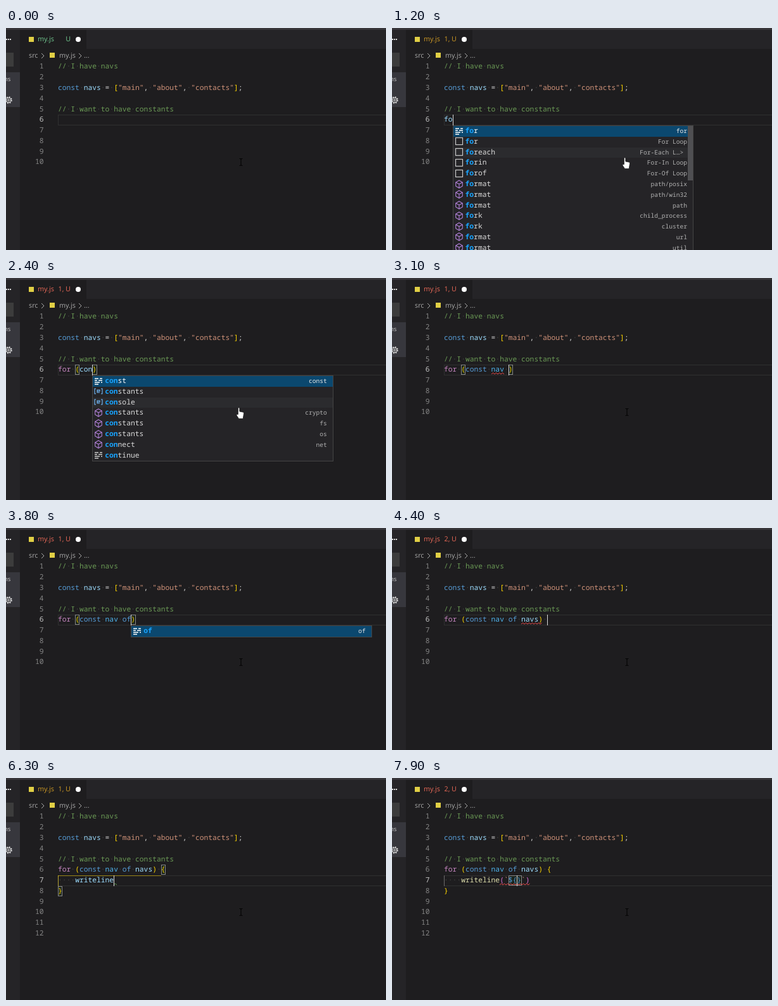
These frames come from a looping animation (600 px wide and 351 px high, 8000 ms). An HTML page:

```html
<!DOCTYPE html>
<html lang="en">
<head>
<meta charset="utf-8">
<title>Typing a loop in an editor</title>
<style>
html, body { margin: 0; width: 100%; height: 100%; overflow: hidden; background: #1e1d1f; }
#stage { position: relative; width: 600px; height: 351px; overflow: hidden; background: #1e1d1f; color: #dadada;
  font: 500 11.3px/16.78px "Noto Sans Mono", "DejaVu Sans Mono", monospace; text-rendering: geometricPrecision; }
#stage div, #stage svg { position: absolute; box-sizing: border-box; white-space: pre; }
#stage svg { overflow: visible; fill: none; }
#stage .ui { font: 10.8px/16px "Open Sans", sans-serif; color: #a9a9a9; }
.dot { color: #464646; }
.hit { color: #18a3ff; font-weight: bold; }
.detail { right: 9px; font-size: 9.6px; color: #b0b0b0; }
</style>
</head>
<body>
<div id="stage"><div id="frame"></div><div id="live"></div></div>
<script>
const LOOP = 8000, CHAR = 6.78, ROW = 16.78, LEFT = 82, POP_W = 380.5;
const GREEN = '#73c991', ORANGE = '#cf9a25', RED = '#ea6a58', ERROR = '#f14c4c', HINT = '#5fa04e';

const colX = c => LEFT + c * CHAR;
const lineY = n => 61.8 + (n - 1) * ROW - ROW / 2;

const box = (x, y, w, h, css, inner = '', cls = '') =>
  `<div class="${cls}" style="left:${x}px;top:${y}px;${w ? `width:${w}px;` : ''}${h ? `height:${h}px;` : ''}${css}">${inner}</div>`;
const rect = (x, y, w, h, color) => box(x, y, w, h, `background:${color}`);
const ui = (x, y, text, css = '') => box(x, y - 8, 0, 16, css, text, 'ui');
const svg = (x, y, stroke, inner) =>
  `<svg width="1" height="1" style="left:${x}px;top:${y}px" stroke="${stroke}">${inner}</svg>`;
const path = (d, extra = '') => `<path d="${d}" ${extra}/>`;
const span = (text, color) => `<span style="color:${color}">${text}</span>`;

// The caret is the bar inside each line; lists open at the caret.
const OPEN = 'for (const nav of navs) {';
const EOF_ERR = [10, 0, 1, ERROR];
const steps = [
  [-600, '|'],
  [800, 'f|'],
  [1000, 'f|', null, 'loops'],
  [1200, 'fo|', null, 'loops'],
  [1400, 'for|', null, 'loops', EOF_ERR],
  [1900, 'for |', null, '', EOF_ERR],
  [2000, 'for (|)'],
  [2200, 'for (c|)', null, 'consts'],
  [2300, 'for (co|)', null, 'consts'],
  [2400, 'for (con|)', null, 'consts'],
  [2500, 'for (cons|)', null, 'consts'],
  [2600, 'for (const|)', null, 'consts'],
  [2700, 'for (const |)'],
  [2800, 'for (const n|)', null, 'words'],
  [2900, 'for (const na|)'],
  [3000, 'for (const nav|)', null, '', [6, 11, 3, ERROR]],
  [3100, 'for (const nav |)', null, '', [6, 11, 3, ERROR]],
  [3700, 'for (const nav o|)', null, 'ofs'],
  [3800, 'for (const nav of|)', null, 'ofs'],
  [3900, 'for (const nav of |)'],
  [4000, 'for (const nav of n|)', null, 'names'],
  [4100, 'for (const nav of na|)', null, 'names'],
  [4200, 'for (const nav of navs|)'],
  [4300, 'for (const nav of navs)|', null, '', [6, 18, 5, ERROR]],
  [4400, 'for (const nav of navs) |', null, '', [6, 18, 5, ERROR]],
  [4600, OPEN + '|}'],
  [4700, OPEN, '    |'],
  [5000, OPEN, '    w|', 'writes'],
  [5100, OPEN, '    wr|', 'writes'],
  [5200, OPEN, '    wri|', 'writes', [7, 7, 1, HINT]],
  [5300, OPEN, '    writ|', 'writes', [7, 8, 1, HINT]],
  [5400, OPEN, '    write|', 'writes', [7, 9, 1, HINT]],
  [5500, OPEN, '    writel|', 'writes'],
  [5600, OPEN, '    writeli|', 'writes'],
  [5700, OPEN, '    writelin|', 'writes'],
  [5900, OPEN, '    writeline|', '', [7, 13, 1, HINT]],
  [6500, OPEN, '    writeline(|)'],
  [7000, OPEN, '    writeline(`|`)'],
  [7500, OPEN, '    writeline(`$|`)'],
  [7700, OPEN, '    writeline(`${|}`)', '', [7, 13, 7, ERROR]],
];
const tabs = [[0, 'U', GREEN], [900, '1, U', ORANGE], [2000, '1, U', RED],
  [4300, '2, U', RED], [4800, '1, U', ORANGE], [7700, '2, U', RED]];

// Rows are "icon label detail".
const lists = {
  loops: [86, 'k for for|s for For Loop|s foreach For-Each L…&gt; |s forin For-In Loop|s forof For-Of Loop|m format path/posix|m format path/win32|m format path|m fork child_process|m fork cluster|m format url|m format util'],
  consts: [0, 'k const const|v constants|v console|m constants crypto|m constants fs|m constants os|m connect net|m copyFile fs|k continue|k class|k case|k catch'],
  words: [0, 'v navs'],
  ofs: [0, 'k of of|m open fs|m opendir fs|m openSync fs|v os|m once events|m on events|v Object'],
  names: [0, 'v navs|v name|v navigator|v NaN|k new|k null|m normalize path|v Number'],
  writes: [65, 'm write fs|m write fs/promises|m writeFile fs|m writeFile fs/promises|m writeFileSync fs|m writeHeapSnapshot v8|m writeSync fs|m writev fs|m writevSync fs|v writer repl|v WritableStream|v WritableStreamDefaultWriter'],
};

const icons = {
  k: c => path('M-6-4H0M2-4H6M-6-1H-2M0-1H6M-6 2H2M4 2H6M-6 5H0', `stroke="${c || '#ccc'}" stroke-width="1.5"`),
  s: c => `<rect x="-5.5" y="-5.5" width="11" height="11" stroke="${c || '#c8c8c8'}" stroke-width="1.2"/>`,
  m: c => path('M0-6L5.3-3V3L0 6L-5.3 3V-3ZM-5.3-3L0-.2L5.3-3M0-.2V6', `stroke="${c || '#b180d7'}" stroke-width="1.1"`),
  v: c => path('M-4-4H-6V4H-4M4-4H6V4H4M-2 0H2V-2H-2V2H2', `stroke="${c || '#75beff'}" stroke-width="1.1"`),
};

const pairs = ['#ffd700', '#da70d6', '#179fff'];
const dots = text => text.replace(/ /g, '<span class="dot">·</span>');

// Colours one line; nest carries the bracket depth on to the next.
function paint(line, nest) {
  let inTemplate = false;
  return line.replace(/\/\/.*|"[^"]*"|`|\$\{?|\w+| |[^\w ]/g, (tok, at) => {
    const rest = line.slice(at + tok.length);
    if (tok === ' ') return dots(tok);
    if (tok.startsWith('//')) return span(dots(tok), '#6a9955');
    if (tok[0] === '"' || tok === '`' || tok === '$') return span(tok, '#ce9178');
    if (tok === '${') { inTemplate = true; return span(tok, '#569cd6'); }
    if (tok === '}' && inTemplate) { inTemplate = false; return span(tok, '#569cd6'); }
    if ('([{'.includes(tok)) return span(tok, pairs[nest.depth++ % 3]);
    if (')]}'.includes(tok)) return span(tok, pairs[Math.max(0, --nest.depth) % 3]);
    if (tok === 'for' && /^ *\(/.test(rest)) return span(tok, '#c586c0');
    if (tok === 'const' || tok === 'of') return span(tok, '#569cd6');
    if (tok === 'nav') return span(tok, '#4fb4ec');
    if (/^\w/.test(tok)) return span(tok, rest[0] === '(' ? '#dcdcaa' : '#9cdcfe');
    return tok;
  });
}

// Innermost bracket pair around the caret, as [line, col, width] marks.
function matchMarks(lines, line, col) {
  const stack = [], caret = line * 1000 + col;
  for (let l = 0; l < lines.length; l++) {
    for (let c = 0; c < lines[l].length; c++) {
      const ch = lines[l][c], pos = l * 1000 + c;
      if ('([{'.includes(ch)) stack.push([l, c, pos]);
      if (!')]}'.includes(ch)) continue;
      const [ol, oc, start] = stack.pop();
      if (start > caret || caret > pos + 1) continue;
      const wide = lines[ol][oc - 1] === '$' ? 1 : 0;
      return [[ol, oc - wide, 1 + wide], [l, c, 1]];
    }
  }
  return [];
}

function squiggle([line, col, len, color]) {
  let d = 'M0 2';
  for (let x = 2.5, up = true; x <= len * CHAR + 0.5; x += 2.5, up = !up) d += `L${x} ${up ? 0 : 2}`;
  return svg(colX(col), lineY(line) + ROW - 4.2, color, path(d));
}

function popup(name, word, x, y) {
  const [thumb, rows] = lists[name];
  const all = rows.split('|').map(r => /^(\w) (\S+) ?(.*)$/.exec(r).slice(1));
  let shown = all.filter(r => r[1].toLowerCase().startsWith(word));
  if (!shown.length) shown = all.slice(-1);
  let html = '';
  shown.forEach(([icon, label, detail], i) => {
    const top = i * ROW, hover = y + top <= 203 && y + top + ROW > 203;
    let n = 0;
    while (n < word.length && label[n].toLowerCase() === word[n]) n++;
    const bg = i === 0 ? '#0b486f' : hover ? '#2b2b2e' : 'transparent';
    const text = `<span class="hit">${label.slice(0, n)}</span>${label.slice(n)}`;
    html += box(0, top, POP_W - 2, ROW, `background:${bg}`,
      svg(9, 7.6, 'none', icons[icon](i === 0 ? '#fff' : '')) +
      box(19, 0, 0, 0, i === 0 ? 'color:#fff' : '', text) +
      `<div class="detail" style="${i === 0 ? 'color:#e8e8e8' : ''}">${detail}</div>`);
  });
  if (thumb) html += rect(POP_W - 10, 0, 8, thumb, '#4f4f52');
  const h = shown.length * ROW + 2;
  return { bottom: y + h, html: box(x, y, POP_W, h, 'background:#252427;border:1px solid #454545;overflow:hidden', html) };
}

const beam = svg(371, 212, '#050505', path('M-2.5-5.5H-1L0-4.5L1-5.5H2.5M0-4.5V4.5M-2.5 5.5H-1L0 4.5L1 5.5H2.5', 'stroke-width="1.2"'));
const hand = svg(370, 213.5, '#111',
  path('M-3 1V-6.5Q-2-8.5-1-6.5V-2.5L4-1.5Q5-1 4.5 1L3.5 7H-2L-5 2.5Q-5.5.5-3 1.5Z', 'fill="#fff" stroke-width=".6" transform="scale(1.2)"'));

function frame() {
  const chevron = x => svg(x, 43.7, '#a9a9a9', path('M-2-4L2 0L-2 4'));
  const fileIcon = (x, y) => rect(x, y - 4, 8, 8, '#e0cf45');
  const code = (n, text) => box(LEFT, lineY(n), 0, 0, '', paint(text, { depth: 0 }));
  return rect(0, 0, 600, 33, '#252427') + rect(0, 0, 22, 351, '#252427') +
    rect(22, 3, 105, 30, '#1e1d1f') + rect(0, 0, 600, 3, '#38363a') +
    [1, 4, 7].map(x => rect(x - 0.7, 17, 1.5, 1.5, '#ddd')).join('') +
    rect(0, 39, 12, 22, '#3c3c3c') + rect(0, 70, 22, 55, '#37373d') +
    ui(-3, 81, 'ns', 'font-size:9.5px;color:#ccc') +
    svg(4, 114, '#ddd', '<circle r="4.8" stroke-width="1.8" stroke-dasharray="2 1.77"/><circle r="3.7"/><circle r="1.4"/>') +
    fileIcon(36, 18) + box(110, 14, 8, 8, 'background:#fff;border-radius:50%') +
    ui(36, 43.7, 'src') + chevron(57.5) + fileIcon(69, 43) + ui(84, 43.7, 'my.js') + chevron(116.5) + ui(123, 43.7, '...') +
    code(1, '// I have navs') + code(3, 'const navs = ["main", "about", "contacts"];') +
    code(5, '// I want to have constants');
}

function live(t) {
  const [at, first, second, list, mark] = steps.filter(s => s[0] <= t).pop();
  const [, count, color] = tabs.filter(s => s[0] <= t).pop();
  const raw = second == null ? [first] : [first, second, '}'];
  const cur = raw.findIndex(l => l.includes('|')), col = raw[cur].indexOf('|');
  const lines = raw.map(l => l.replace('|', ''));
  const active = 6 + cur, nest = { depth: 0 };

  let html = ui(50, 18, 'my.js', `color:${color}`) +
    box(72, 10, 30, 16, `text-align:right;color:${color}`, count, 'ui');
  for (let n = 1; n <= (second == null ? 10 : 12); n++) {
    html += box(30, lineY(n), 29.5, 0, `text-align:right;color:${n === active ? '#c6c6c6' : '#858585'}`, n);
  }
  html += box(LEFT, lineY(active), 530, ROW, 'border:1px solid #303030');
  if (second != null) html += rect(LEFT, lineY(7), 1, ROW, '#6b6b6b');

  const marks = matchMarks(lines, cur, col);
  if (marks.length && marks[0][0] < marks[1][0]) {
    const guide = 'rgba(255,215,0,.5)';
    html += rect(LEFT, lineY(7), 1, ROW, guide) + rect(LEFT, lineY(7), marks[0][1] * CHAR, 1, guide);
  }
  for (const [l, c, w] of marks) {
    html += box(colX(c), lineY(6 + l), w * CHAR + 0.5, ROW - 0.8, 'border:1px solid #888;background:rgba(0,100,0,.1)');
  }
  lines.forEach((l, i) => { html += box(LEFT, lineY(6 + i), 0, 0, '', paint(l, nest)); });
  if (mark) html += squiggle(mark);
  if ((t - at) % 1000 < 500) html += rect(colX(col), lineY(active), 1.2, ROW, '#d8d8d8');

  let pointer = beam;
  if (list) {
    const word = /\w*$/.exec(lines[cur].slice(0, col))[0];
    const pop = popup(list, word, Math.min(colX(col), 600 - POP_W), lineY(active) + ROW);
    html += pop.html;
    if (pop.bottom > 204) pointer = hand;
  }
  return html + pointer;
}

const layer = document.getElementById('live');
document.getElementById('frame').innerHTML = frame();
const begin = performance.now();
let last = '';
function tick() {
  const html = live((performance.now() - begin) % LOOP);
  if (html !== last) layer.innerHTML = last = html;
  requestAnimationFrame(tick);
}
tick();
</script>
</body>
</html>
```
